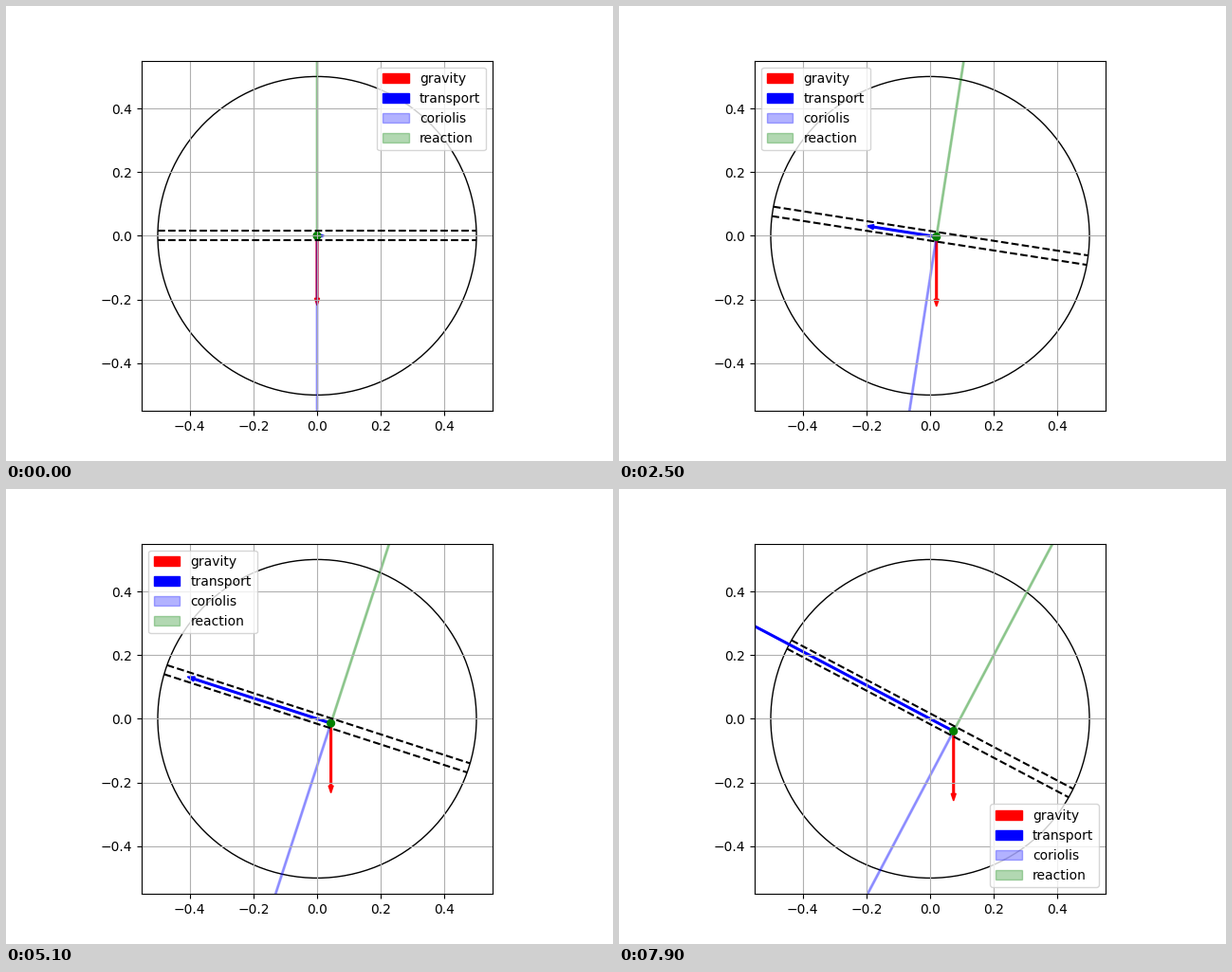
A matplotlib script for the animation above (8 s loop, 640 px wide and 480 px high).

```python
import numpy as np
import matplotlib.pyplot as plt
from matplotlib.animation import FuncAnimation

FRAMES = 80
OMEGA = np.pi      # disc speed, clockwise
DT = 1 / 511
G = 9.81
V0 = 0.4           # initial speed along the slot
R = 0.5            # disc radius
SLOT = 0.015       # half width of the slot


def slide(theta):
    """Position and speed of the ball along the rotating slot."""
    k = G / (2 * OMEGA**2)
    r = V0 / OMEGA * np.sinh(theta) + k * (np.sinh(theta) - np.sin(theta))
    v = V0 * np.cosh(theta) + k * OMEGA * (np.cosh(theta) - np.cos(theta))
    return r, v


fig, ax = plt.subplots(figsize=(6.4, 4.8), dpi=100)
ax.set_aspect("equal")
ax.grid(True)
ax.add_patch(plt.Circle((0, 0), R, fill=False))
walls = [ax.plot([], [], "k--")[0] for _ in range(2)]


def arrow(label, color, alpha=None):
    return ax.arrow(0, 0, 0, 1, width=0.005, color=color, alpha=alpha, label=label)


gravity = arrow("gravity", "red")
transport = arrow("transport", "blue")
coriolis = arrow("coriolis", "blue", 0.3)
reaction = arrow("reaction", "green", 0.3)
ball = ax.add_patch(plt.Circle((0, 0), 0.0115, color="green"))
ax.set_xlim(-0.55, 0.55)
ax.set_ylim(-0.55, 0.55)
legend = ax.legend(loc="upper right")


def legend_spot(i):
    if i < 11:
        return "upper right"
    return "upper left" if i < 71 else "lower right"


def update(i):
    theta = OMEGA * DT * i
    along = np.array([np.cos(theta), -np.sin(theta)])
    normal = np.array([np.sin(theta), np.cos(theta)])
    r, v = slide(theta)
    x, y = pos = r * along

    for wall, side in zip(walls, (SLOT, -SLOT)):
        a, b = side * normal - R * along, side * normal + R * along
        wall.set_data([a[0], b[0]], [a[1], b[1]])

    inward = -OMEGA**2 * r * along if i else 1e-9 * along
    side_pull = 2 * OMEGA * v * normal
    vectors = (
        (gravity, (0, -G / 50)),
        (transport, inward),
        (coriolis, -side_pull),
        (reaction, side_pull),
    )
    for item, (dx, dy) in vectors:
        item.set_data(x=x, y=y, dx=dx, dy=dy)

    ball.center = tuple(pos)
    legend.set_loc(legend_spot(i))
    return []


anim = FuncAnimation(fig, update, frames=FRAMES, interval=100,
                     repeat=True, repeat_delay=0, blit=False)
plt.show()
```
